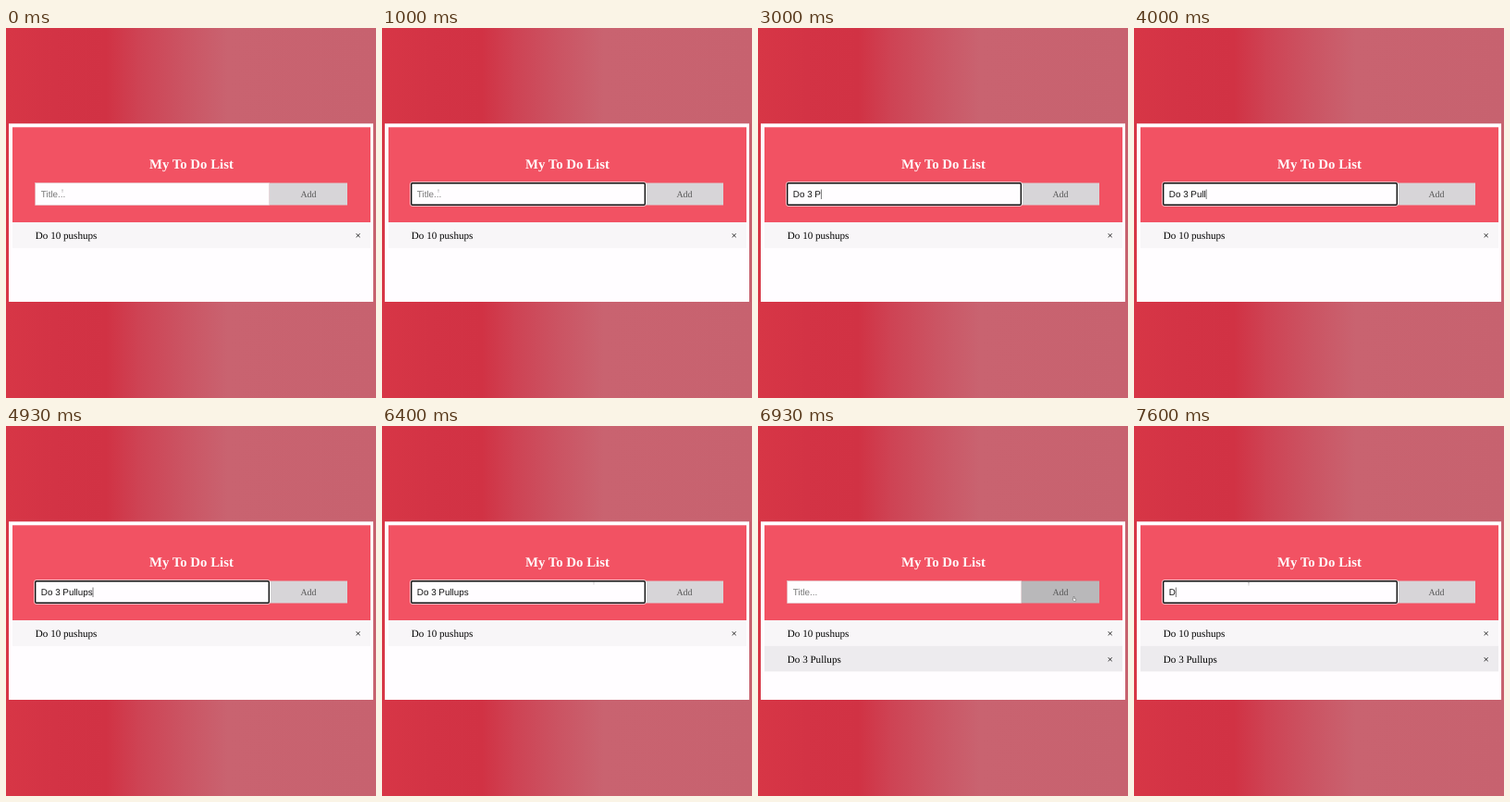
Write an HTML page that moves like this. It is 400 px wide and 400 px high and loops after 8 s.

```html
<!DOCTYPE html>
<html lang="en">
<head>
<meta charset="utf-8">
<title>To do list</title>
<style>
  html, body { margin: 0; width: 100%; height: 100%; overflow: hidden; }
  svg { display: block; width: 100%; height: 100%; }
  text { font-family: "Liberation Serif", serif; font-size: 11.1px; text-rendering: geometricPrecision; white-space: pre; }
  .heading { font-size: 14.8px; font-weight: bold; fill: #fffafb; text-anchor: middle; }
  .small { font-size: 9.87px; }
  #field { font-family: "Liberation Sans", sans-serif; }
  .middle { text-anchor: middle; }
</style>
</head>
<body>
<svg viewBox="0 0 400 400">
  <defs>
    <linearGradient id="backdrop">
      <stop offset="0" stop-color="#d73646"/>
      <stop offset=".13" stop-color="#d33345"/>
      <stop offset=".27" stop-color="#d13244"/>
      <stop offset=".36" stop-color="#ce4354"/>
      <stop offset=".48" stop-color="#cb5463"/>
      <stop offset=".6" stop-color="#c96370"/>
      <stop offset="1" stop-color="#c7626f"/>
    </linearGradient>
  </defs>
  <rect width="400" height="400" fill="url(#backdrop)"/>
  <rect x="3" y="103.3" width="394" height="192.7" fill="#fffdff"/>
  <rect x="7" y="107.3" width="387" height="102.9" fill="#f25263"/>
  <text class="heading" x="200.4" y="152">My To Do List</text>

  <rect id="button" x="284.5" y="167.5" width="84.5" height="24"/>
  <text class="small middle" x="327" y="183.2" fill="#555">Add</text>

  <rect x="31.7" y="167.5" width="253" height="24" fill="#fffdff" stroke="#dcd3d6" stroke-width=".5"/>
  <g id="focus" fill="none">
    <rect x="30.7" y="166.7" width="254.6" height="25.6" rx="1.8" stroke="#fff" stroke-width=".8"/>
    <rect x="31.7" y="167.7" width="252.6" height="23.6" rx="1.2" stroke="#101010" stroke-width="1.4"/>
  </g>
  <text id="field" class="small" x="37.8" y="183.2"></text>
  <rect id="caret" y="174.5" width=".6" height="10.5" fill="#222"/>

  <rect x="7" y="210.2" width="387" height="27.6" fill="#f8f6f8"/>
  <text x="31.8" y="228">Do 10 pushups</text>
  <text class="middle" x="380.6" y="228">×</text>
  <g id="added">
    <rect x="7" y="237.8" width="387" height="27.6" fill="#edebee"/>
    <text x="31.8" y="255.7">Do 3 Pullups</text>
    <text class="middle" x="380.6" y="255.7">×</text>
  </g>

  <path id="beam" d="M-1-1.5h2M0-1.5v3" fill="none" stroke="#777" stroke-width=".5" opacity=".7"/>
  <path id="hand" d="M-1-2.5V0l-1 .2 1.4 2.2h2l.5-2.2-1.9-.7v-2z" fill="#fff" stroke="#555" stroke-width=".5"/>
</svg>
<script>
const LOOP = 8000, ADD_AT = 6730, REFOCUS_AT = 7400;
const el = id => document.getElementById(id);
const show = (id, on) => el(id).setAttribute("display", on ? "inline" : "none");

// [time, typed text, caret visible]
const typing = [
  [0, "", false], [270, "", true], [1000, "", false],
  [1270, "Do", true], [1730, "Do ", true], [2000, "Do 3", true],
  [2270, "Do 3 ", true], [2470, "Do 3 ", false], [3000, "Do 3 P", true],
  [3270, "Do 3 Pu", true], [3470, "Do 3 Pul", true], [4000, "Do 3 Pull", true],
  [4270, "Do 3 Pullu", true], [4470, "Do 3 Pullup", true], [4730, "Do 3 Pullups", true],
  [5070, "Do 3 Pullups", false], [ADD_AT, "", false],
  [REFOCUS_AT, "", true], [7600, "D", true]
];

// [time, x, y] of the pointer
const route = [
  [0, 61, 176.5], [2470, 61, 176.5], [2471, 238, 147], [5130, 238, 147],
  [5400, 159, 147], [5870, 159, 147], [6400, 229, 170], [6670, 342, 187],
  [7050, 342, 187], [7530, 124, 171], [LOOP, 124, 171]
];

function pointerAt(t) {
  const i = route.findIndex(p => p[0] > t);
  const [t0, x0, y0] = route[i - 1], [t1, x1, y1] = route[i];
  const k = (t - t0) / (t1 - t0), ease = k * k * (3 - 2 * k);
  return [x0 + (x1 - x0) * ease, y0 + (y1 - y0) * ease];
}

function draw(t) {
  const [, typed, caretOn] = typing.findLast(step => step[0] <= t);
  const field = el("field");
  field.textContent = typed || "Title...";
  field.setAttribute("fill", typed ? "#111" : "#757575");
  const width = typed ? field.getComputedTextLength() : 0;
  el("caret").setAttribute("x", 37.8 + width);
  show("caret", caretOn);
  show("focus", (t >= 270 && t < ADD_AT) || t >= REFOCUS_AT);
  show("added", t >= ADD_AT);

  const [x, y] = pointerAt(t), overButton = x > 285;
  el("button").setAttribute("fill", overButton ? "#b9b8ba" : "#d7d5d8");
  for (const id of ["beam", "hand"]) el(id).setAttribute("transform", `translate(${x} ${y})`);
  show("beam", !overButton && y > 165);
  show("hand", overButton);
}

function frame() {
  draw(performance.now() % LOOP);
  requestAnimationFrame(frame);
}
frame();
</script>
</body>
</html>
```
